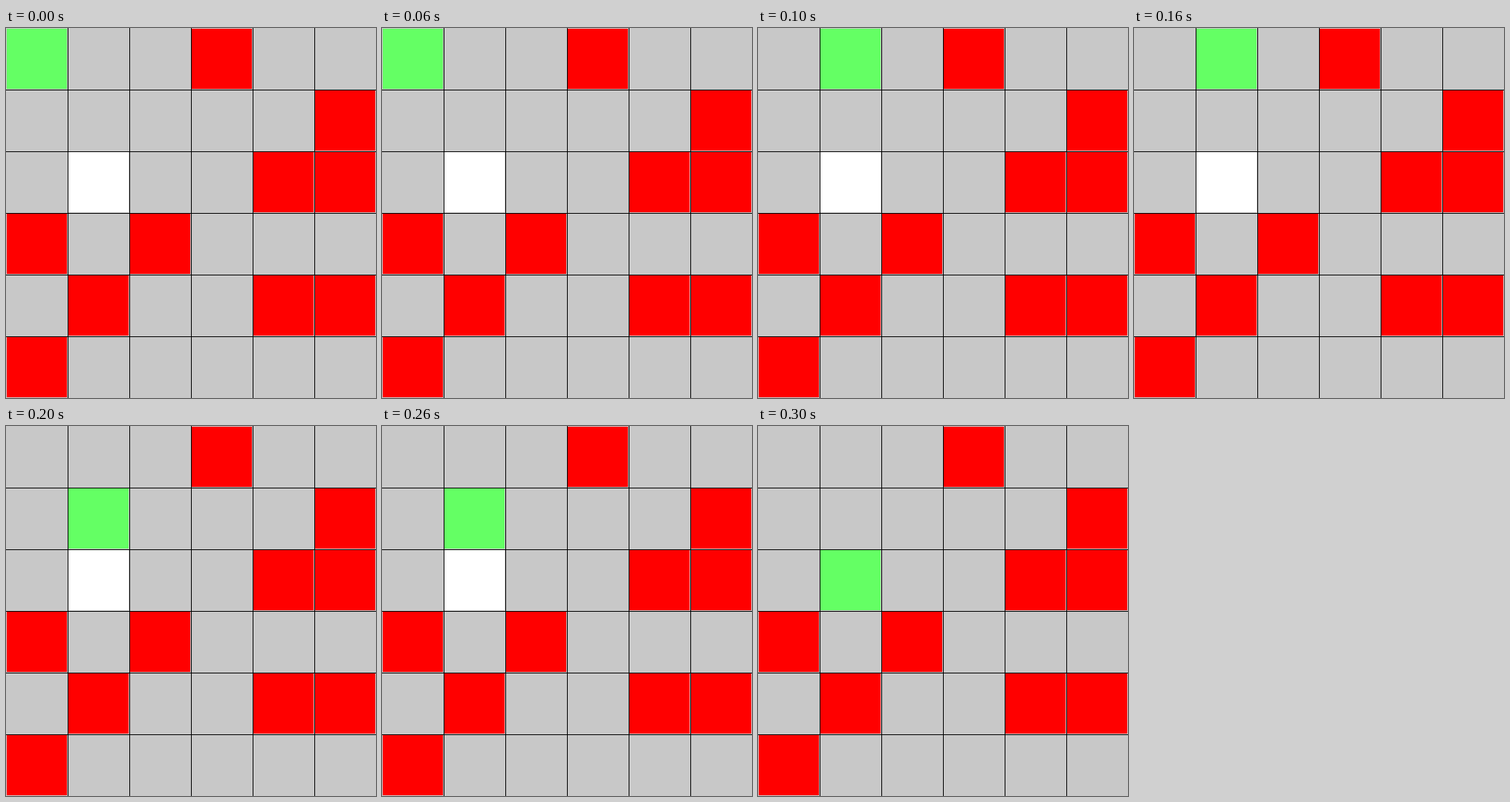
An HTML page for the animation above (400 ms loop, 498 by 498 pixels).

```html
<!DOCTYPE html>
<html lang="en">
<head>
<meta charset="utf-8">
<title>Grid walk</title>
<style>
  html, body { margin: 0; width: 100%; height: 100%; overflow: hidden; background: #c8c8c8; }
  svg { display: block; }
</style>
</head>
<body>
<svg id="stage" width="498" height="498" viewBox="0 0 498 498" shape-rendering="crispEdges"></svg>
<script>
const STEP = 100, CELL = 83, COUNT = 6, SIZE = CELL * COUNT;
const walls = [[3, 0], [5, 1], [4, 2], [5, 2], [0, 3], [2, 3], [1, 4], [4, 4], [5, 4], [0, 5]];
const path = [[0, 0], [1, 0], [1, 1], [1, 2]];
const goal = [1, 2];
const stage = document.getElementById('stage');

function rect(x, y, width, height, fill) {
  const el = document.createElementNS('http://www.w3.org/2000/svg', 'rect');
  for (const [key, value] of Object.entries({ x, y, width, height, fill })) el.setAttribute(key, value);
  return stage.appendChild(el);
}

const tile = ([col, row], fill) => rect(col * CELL + 1, row * CELL + 1, CELL - 2, CELL - 2, fill);

rect(0, 0, SIZE, SIZE, '#c8c8c8');
for (let i = 1; i < COUNT; i++) {
  rect(i * CELL, 0, 1, SIZE, '#000');
  rect(0, i * CELL, SIZE, 1, '#000');
}
walls.forEach(cell => tile(cell, '#f00'));
tile(goal, '#fff');
const walker = tile(path[0], '#64ff64');

function draw(time) {
  const [col, row] = path[Math.floor(time / STEP) % path.length];
  walker.setAttribute('x', col * CELL + 1);
  walker.setAttribute('y', row * CELL + 1);
}

const start = performance.now();
function tick() {
  draw(performance.now() - start);
  requestAnimationFrame(tick);
}
tick();
</script>
</body>
</html>
```
